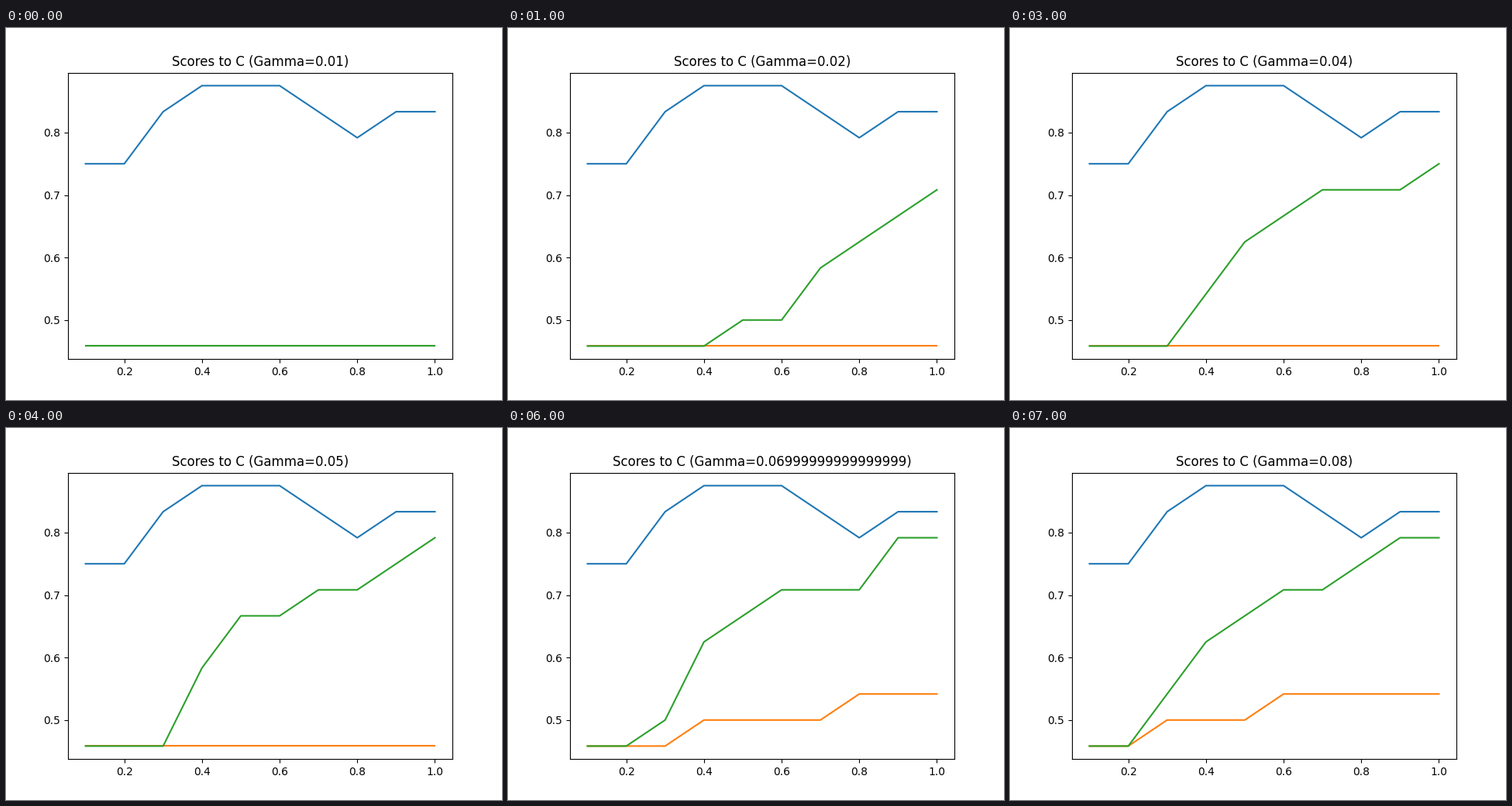
Write a matplotlib script that moves like this. It is 640 by 480 pixels and loops after 8000 ms.

```python
import matplotlib.pyplot as plt
import numpy as np
from matplotlib.animation import FuncAnimation

FRAMES = 8
SAMPLES = 24
BASE = 11
C = np.arange(1, 11) / 10

# Each extra correct answer appears once C passes base + slope * (0.05 / gamma)**power.
ORANGE = dict(base=[0.08, 0.32], slope=[1.0, 1.6], power=4)
GREEN = dict(base=[0.27, 0.273, 0.32, 0.36, 0.39, 0.54, 0.745, 0.78],
             slope=[0.035, 0.06, 0.06, 0.07, 0.08, 0.07, 0.12, 0.15],
             power=2)


def score(gamma, base, slope, power):
    limits = np.array(base) + np.array(slope) * (0.05 / gamma) ** power
    gained = (C[:, None] >= limits).sum(axis=1)
    return (BASE + gained) / SAMPLES


# The blue curve does not depend on gamma.
blue = np.interp(C, [0.2, 0.3, 0.4, 0.6, 0.8, 0.9],
                 [18, 20, 21, 21, 19, 20]) / SAMPLES

fig, ax = plt.subplots(figsize=(6.4, 4.8), dpi=100)
ax.plot(C, blue, color="C0")
orange, = ax.plot(C, score(0.01, **ORANGE), color="C1")
green, = ax.plot(C, score(0.01, **GREEN), color="C2")
title = ax.set_title("")


def update(i):
    # Left unrounded: the title shows the float error.
    gamma = 0.01 + i * 0.01
    title.set_text(f"Scores to C (Gamma={gamma})")
    orange.set_ydata(score(gamma, **ORANGE))
    green.set_ydata(score(gamma, **GREEN))
    return title, orange, green


anim = FuncAnimation(fig, update, frames=FRAMES, interval=1000,
                     repeat=True, repeat_delay=0)
plt.show()
```
